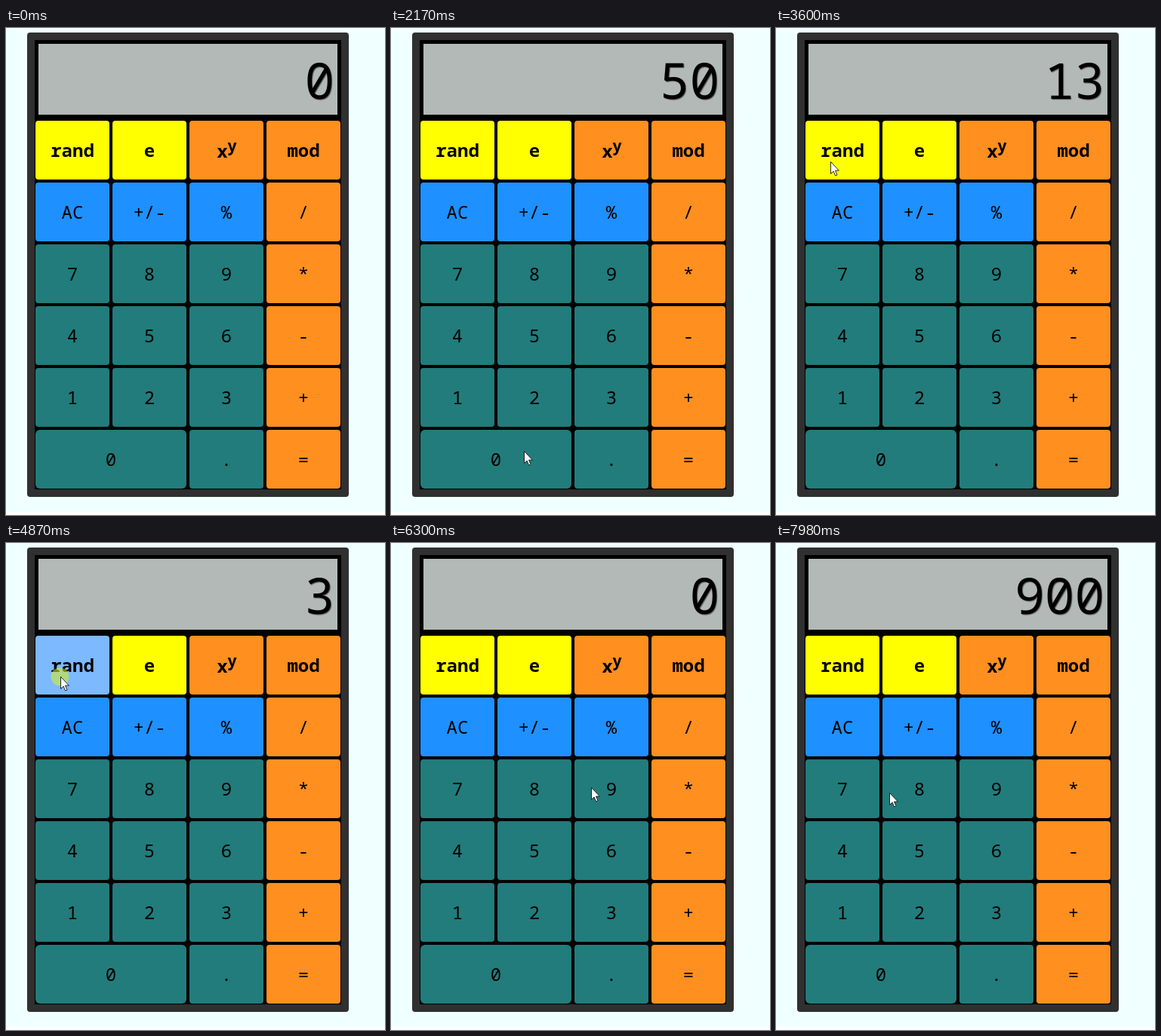
An HTML page that plays this animation: 502x646 px, repeating every 8 s.

```html
<!DOCTYPE html>
<html lang="en">
<head>
<meta charset="utf-8">
<title>Calculator</title>
<style>
  html, body { margin: 0; width: 100%; height: 100%; overflow: hidden; background: #fff; }
  svg { display: block; width: 502px; height: 646px; }
  text { font: 24px "Noto Sans Mono", "DejaVu Sans Mono", monospace; text-anchor: middle; white-space: pre; }
  .bold { font-weight: 700; }
  #display { font-size: 66px; text-anchor: end; text-shadow: 1px 1px 1px rgba(0, 0, 0, .55); }
  .fn { fill: #ff0; }
  .op { fill: #ff8f1f; }
  .edit { fill: #1e90ff; }
  .digit { fill: #227c7c; }
  .fn.down { fill: #7db9ff; }
  .edit.down { fill: #7db9ff; }
  .digit.down { fill: #35baba; }
</style>
</head>
<body>
<svg viewBox="0 0 502 646">
  <rect width="502" height="642" fill="#f0ffff"/>
  <rect x="28" y="6" width="426" height="616" rx="4" fill="#303030"/>
  <rect x="38" y="16" width="406" height="596"/>
  <rect x="43" y="21" width="396" height="94" fill="#b2b9b6"/>
  <text id="display" x="435" y="93.5">0</text>
  <g id="keys"></g>
  <g id="pointer">
    <circle id="halo" cx="-.5" cy=".5" r="12" fill="rgb(220,243,30)" fill-opacity=".55"/>
    <path d="M.5 .5V16.4L4.1 13L6.6 18.9L9 17.9L6.5 12.1H11.4Z" fill="#fff" stroke="#111" stroke-width=".9"/>
  </g>
</svg>
<script>
const LOOP = 8000, STEP = 70;
const $ = id => document.getElementById(id);
const display = $('display'), pointer = $('pointer'), halo = $('halo');
const keys = {};

function add(tag, attrs, text = '') {
  const node = document.createElementNS('http://www.w3.org/2000/svg', tag);
  for (const name in attrs) node.setAttribute(name, attrs[name]);
  node.textContent = text;
  $('keys').append(node);
  return node;
}

function keyClass(label, row, col) {
  if (row === 0 && col < 2) return 'fn';
  if (col === 3 || row === 0) return 'op';
  return row === 1 ? 'edit' : 'digit';
}

const rows = ['rand e xy mod', 'AC +/- % /', '7 8 9 *', '4 5 6 -', '1 2 3 +', '0 . ='];
rows.forEach((line, row) => {
  let col = 0;
  for (const label of line.split(' ')) {
    const wide = label === '0';
    const x = 39 + col * 102, y = 123 + row * 82, width = wide ? 200 : 98;
    keys[label] = add('rect', { x, y, width, height: 78, rx: wide ? 6 : 4, class: keyClass(label, row, col) });
    const weight = row ? '' : 'bold';
    if (label === 'xy') {
      add('text', { x: x + 43.5, y: y + 49, class: weight }, 'x');
      add('text', { x: x + 56.5, y: y + 41, class: weight, style: 'font-size:21px' }, 'y');
    } else {
      add('text', { x: x + width / 2, y: y + 47.5, class: weight }, label);
    }
    col += wide ? 2 : 1;
  }
});

const linear = p => p;
const easeOut = p => 1 - (1 - p) ** 1.8;
const easeBoth = p => p * p * (3 - 2 * p);

// Pointer moves: start time, steps, start, control and end points, easing.
const moves = [
  [120, 10, [452, 640], [245, 395], [179, 391], easeOut],
  [1680, 6, [179, 391], [178, 476], [176, 561], easeBoth],
  [2240, 8, [176, 561], [-64, 233], [72, 177], linear],
  [5470, 3, [72, 177], [80, 206], [84, 238], linear],
  [5880, 7, [84, 238], [225, 420], [265, 324], easeOut],
  [6960, 6, [265, 324], [215, 430], [178, 566], easeBoth],
  [7770, 4, [178, 566], [165, 450], [150, 331], linear]
];

// Clicks: key, press time, release time, resulting display.
const clicks = [
  ['5', 1220, 1350, '5'],
  ['0', 2100, 2170, '50'],
  ['rand', 2870, 3000, '42'],
  ['rand', 3530, 3600, '13'],
  ['rand', 4070, 4140, '3'],
  ['rand', 4870, 5000, '72'],
  ['AC', 5680, 5810, '0'],
  ['9', 6760, 6890, '9'],
  ['0', 7380, 7450, '90'],
  ['0', 7710, 7710, '900']
];

function pointerAt(time) {
  const move = moves.findLast(m => time >= m[0]);
  if (!move) return null;
  const [start, steps, a, b, c, ease] = move;
  const step = Math.min(steps, Math.floor((time - start) / STEP) + 1);
  const p = ease(step / steps), q = 1 - p;
  return a.map((v, i) => q * q * v + 2 * p * q * b[i] + p * p * c[i]);
}

function draw(now) {
  const time = now % LOOP;
  const point = pointerAt(time);
  pointer.style.display = point ? '' : 'none';
  if (point) pointer.setAttribute('transform', `translate(${point.map(Math.round)})`);

  const active = clicks.find(c => time >= c[1] && time < c[2]);
  for (const label in keys) keys[label].classList.toggle('down', !!active && active[0] === label);
  halo.style.display = active ? '' : 'none';

  const done = clicks.findLast(c => time >= c[2]);
  display.textContent = done ? done[3] : '0';
}

const began = performance.now();
function tick() {
  draw(performance.now() - began);
  requestAnimationFrame(tick);
}
tick();
</script>
</body>
</html>
```
